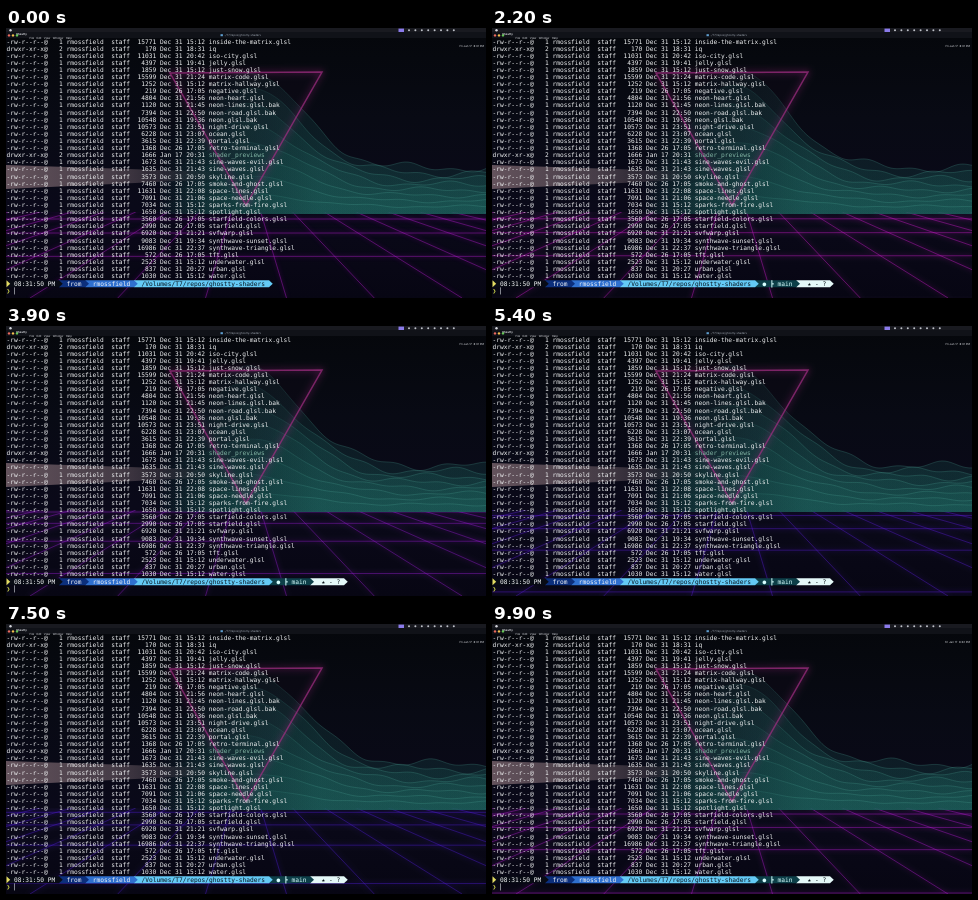
Animation of 480x270 px, one loop 10000 ms. Source, as an HTML page with a canvas:

```html
<!DOCTYPE html>
<html lang="en">
<head>
<meta charset="utf-8">
<title>Terminal</title>
<style>
html, body { margin: 0; width: 100%; height: 100%; overflow: hidden; background: #05060b; }
#stage { position: relative; width: 480px; height: 270px; overflow: hidden; text-rendering: geometricPrecision; }
canvas { position: absolute; inset: 0; }
pre, #bar, #bar span { position: absolute; margin: 0; white-space: pre; }
pre { left: .5px; top: 10.5px; font: 6.23px/7.11px "DejaVu Sans Mono", monospace; color: #f1f3f4; }
pre b { font-weight: 400; color: #83b7a6; }
#bar { left: 0; top: 0; width: 480px; height: 10px; background: linear-gradient(#191a20 0 4.5px, #101218 4.5px); font: 2.8px/4px Inter, sans-serif; color: #d5d7dc; }
</style>
</head>
<body>
<div id="stage">
  <canvas id="scene" width="480" height="270"></canvas>
  <div id="bar">
    <span style="left:10px;font-weight:700">Ghostty</span>
    <span style="left:23.5px">File   Edit   View   Window   Help</span>
    <span style="left:218px;top:5px;color:#9aa2ad">../T7/repos/ghostty-shaders</span>
    <span id="clock" style="right:2px"></span>
  </div>
  <pre id="list"></pre>
</div>
<canvas id="marks" width="480" height="270"></canvas>
<script>
const LOOP = 10000, CELL = 3.75, ROW = 7.11, TOP = 10.5, TAU = Math.PI * 2;
const $ = id => document.getElementById(id);
const c = $('scene').getContext('2d'), m = $('marks').getContext('2d');
const user = 'rmossfield';

// size, date, name
const files = `15771 Dec 31 15:12 inside-the-matrix.glsl
170 Dec 31 18:31 iq
11031 Dec 31 20:42 iso-city.glsl
4397 Dec 31 19:41 jelly.glsl
1859 Dec 31 15:12 just-snow.glsl
15599 Dec 31 21:24 matrix-code.glsl
1252 Dec 31 15:12 matrix-hallway.glsl
219 Dec 26 17:05 negative.glsl
4804 Dec 31 21:56 neon-heart.glsl
1120 Dec 31 21:45 neon-lines.glsl.bak
7394 Dec 31 22:50 neon-road.glsl.bak
10548 Dec 31 19:36 neon.glsl.bak
10573 Dec 31 23:51 night-drive.glsl
6228 Dec 31 23:07 ocean.glsl
3615 Dec 31 22:39 portal.glsl
1368 Dec 26 17:05 retro-terminal.glsl
1666 Jan 17 20:31 shader_previews
1673 Dec 31 21:43 sine-waves-evil.glsl
1635 Dec 31 21:43 sine-waves.glsl
3573 Dec 31 20:50 skyline.glsl
7460 Dec 26 17:05 smoke-and-ghost.glsl
11631 Dec 31 22:08 space-lines.glsl
7091 Dec 31 21:06 space-needle.glsl
7034 Dec 31 15:12 sparks-from-fire.glsl
1650 Dec 31 15:12 spotlight.glsl
3560 Dec 26 17:05 starfield-colors.glsl
2990 Dec 26 17:05 starfield.glsl
6920 Dec 31 21:21 svfwarp.glsl
9083 Dec 31 19:34 synthwave-sunset.glsl
16986 Dec 31 22:37 synthwave-triangle.glsl
572 Dec 26 17:05 tft.glsl
2523 Dec 31 15:12 underwater.glsl
837 Dec 31 20:27 urban.glsl
1030 Dec 31 15:12 water.glsl`.split('\n');

$('list').innerHTML = files.map(line => {
  const size = line.split(' ')[0], rest = line.slice(size.length);
  const mode = /\.glsl/.test(line) ? '-rw-r--r--@   1 ' : 'drwxr-xr-x@   2 ';
  return mode + user + '  staff  ' + size.padStart(5) + rest.replace('shader_previews', '<b>$&</b>');
}).join('\n');

// start column, end column, fill, text colour, text column, text
const segments = [
  [0, 14, '#080b14', '#f4f6f8', 2, '08:31:50 PM'],
  [14, 21, '#0c2f7c', '#f4f6f8', 16, 'from'],
  [21, 34, '#2f70cf', '#f4f6f8', 23, user],
  [34, 70, '#64caf5', '#06121c', 36, '/Volumes/T7/repos/ghostty-shaders'],
  [70, 81, '#0d3f48', '#d8ffff', 72, '● ┣ main'],
  [81, 90, '#e4f8f8', '#0a1418', 84, '★ - ?']
];

function line(g, x1, y1, x2, y2) {
  g.beginPath();
  g.moveTo(x1, y1);
  g.lineTo(x2, y2);
  g.stroke();
}

function dot(x, y, r, color) {
  m.fillStyle = color;
  m.beginPath();
  m.arc(x, y, r, 0, TAU);
  m.fill();
}

function gradient(x1, y1, x2, y2, ...colors) {
  const g = c.createLinearGradient(x1, y1, x2, y2);
  colors.forEach((color, i) => g.addColorStop(i / (colors.length - 1), color));
  return g;
}

function floor(t, hue) {
  const vpY = 135, horizon = 184;
  c.save();
  c.beginPath();
  c.rect(0, horizon, 480, 270 - horizon);
  c.clip();
  c.strokeStyle = `hsla(${hue}, 75%, 48%, .5)`;
  c.shadowColor = `hsl(${hue}, 90%, 45%)`;
  c.shadowBlur = 4;
  c.lineWidth = .8;
  for (let slope = .3; slope < 6; slope += .65)
    for (const s of [-slope, slope])
      line(c, 240 + s * (horizon - vpY), horizon, 240 + s * 135, 270);
  const phase = t * .0009 % 1;
  for (let k = 3; k < 8; k++) {
    const y = vpY + 280 / (k - phase);
    line(c, 0, y, 480, y);
  }
  c.restore();
}

function ridge(x, k, t) {
  const top = 140 - 98 * Math.exp(-(((x - 240) / 75) ** 2));
  const a = TAU * t / LOOP;
  const bumps = 3 * Math.sin(x / 17 + k * 1.3 + a) + 2 * Math.sin(x / 7.3 - k * 2 - 2 * a) * Math.min(1, Math.abs(x - 240) / 120);
  return top + (184 - top) * k / 8 + bumps * (1 - k / 10);
}

function hills(t) {
  for (let k = 0; k < 8; k++) {
    c.beginPath();
    for (let x = 150; x <= 480; x += 3) c.lineTo(x, ridge(x, k, t));
    c.strokeStyle = gradient(150, 0, 480, 0, '#3b9c8c00', '#3b9c8c22', '#55b5a455', '#55b5a455', '#55b5a455');
    c.lineWidth = .7;
    c.stroke();
    c.lineTo(480, 186);
    c.lineTo(150, 186);
    c.fillStyle = gradient(150, 0, 480, 0, '#174f4c00', '#174f4c28', '#1c5f5a38', '#1c5f5a38', '#1c5f5a38');
    c.fill();
  }
}

function beam() {
  c.fillStyle = gradient(0, 0, 215, 0, '#8d747bb0', '#75646c90', '#6b606800');
  c.beginPath();
  c.moveTo(0, 137);
  c.lineTo(215, 144);
  c.lineTo(215, 151);
  c.lineTo(0, 161);
  c.fill();
}

function triangle() {
  c.save();
  c.beginPath();
  c.moveTo(164, 45);
  c.lineTo(316, 44);
  c.lineTo(240, 177);
  c.closePath();
  c.fillStyle = '#33103018';
  c.fill();
  c.strokeStyle = '#a52f86b0';
  c.shadowColor = '#c02c95';
  c.shadowBlur = 6;
  c.lineWidth = 1.5;
  c.stroke();
  c.restore();
}

function scene(t) {
  const hue = 278 + 25 * Math.cos(TAU * (t - 1600) / LOOP);
  c.fillStyle = gradient(0, 0, 0, 270, '#05070b', '#080a14', '#0a0919', '#070613');
  c.fillRect(0, 0, 480, 270);
  floor(t, hue);
  hills(t);
  beam();
  triangle();
}

function prompt(t) {
  const y = TOP + 34 * ROW;
  const shown = segments.slice(0, t < 600 ? 4 : 6);
  m.font = '6.23px "DejaVu Sans Mono", monospace';
  m.textBaseline = 'middle';
  // Right to left, so each arrow overlaps its neighbour.
  for (const [from, to, fill, ink, col, text] of shown.reverse()) {
    const x = from * CELL + .5, end = to * CELL + .5;
    m.fillStyle = fill;
    m.beginPath();
    m.moveTo(x, y);
    m.lineTo(end, y);
    m.lineTo(end + CELL, y + ROW / 2);
    m.lineTo(end, y + ROW);
    m.lineTo(x, y + ROW);
    m.fill();
    m.fillStyle = ink;
    m.fillText(text, col * CELL + .5, y + ROW / 2 + .2);
  }
  m.fillStyle = '#e3dc62';
  m.beginPath();
  m.moveTo(.5, y);
  m.lineTo(4.2, y + ROW / 2);
  m.lineTo(.5, y + ROW);
  m.fill();
  m.fillStyle = '#d5dc4c';
  m.fillText('❯', .5, y + ROW * 1.5);
  if ((t + 200) % 1200 < 600) {
    m.fillStyle = '#b9bec4';
    m.fillRect(8, y + ROW, .7, ROW);
  }
}

function icons() {
  dot(4.5, 2.2, 1.2, '#d5d7dc');
  ['#ec6a5e', '#f4bf4f', '#61c554'].forEach((color, i) => dot(3 + i * 4, 7.4, 1.2, color));
  m.fillStyle = '#5f9fd0';
  m.fillRect(214.5, 6.2, 2.4, 2);
  m.fillStyle = '#8b7bea';
  m.fillRect(392.5, .6, 5.5, 3.4);
  for (let x = 403; x < 450; x += 6.4) dot(x, 2.2, 1, '#bfc2c9');
}

$('stage').append($('marks'));

function frame(now) {
  const t = now % LOOP;
  scene(t);
  m.clearRect(0, 0, 480, 270);
  icons();
  prompt(t);
  $('clock').textContent = 'Fri Jan 17  8:3' + (t < 8200 ? 1 : 2) + ' PM';
  requestAnimationFrame(frame);
}
requestAnimationFrame(frame);
</script>
</body>
</html>
```
